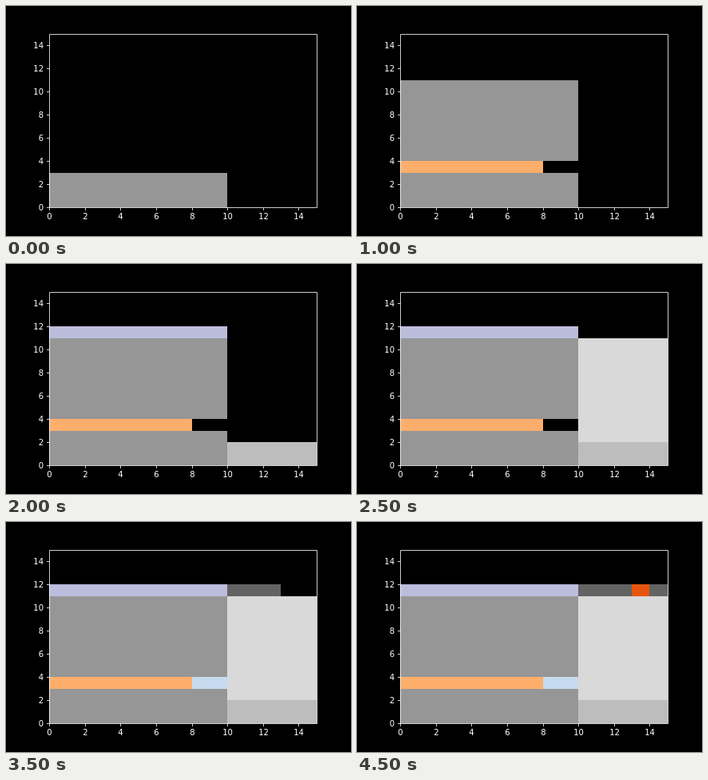
Recreate the animation shown at these times as an HTML page. Size 432 by 288 pixels, loop 5 s.

```html
<!DOCTYPE html>
<html lang="en">
<head>
<meta charset="utf-8">
<title>Stacking rectangles</title>
<style>
  html, body { margin: 0; width: 100%; height: 100%; overflow: hidden; background: #000; }
  svg { display: block; width: 432px; height: 288px; }
  text { font: 10px "DejaVu Sans", sans-serif; fill: #fff; }
  .axes { fill: none; stroke: #fff; stroke-width: 0.8; }
</style>
</head>
<body>
<svg id="chart" viewBox="0 0 432 288"></svg>
<script>
const LOOP = 5000, STEP = 500, MAX = 15;
const LEFT = 54, RIGHT = 388.8, TOP = 34.56, BOTTOM = 252;

// One rectangle appears per step: x, y, width, height in axis units.
const blocks = [
  [0, 0, 10, 3, "#969696"],
  [0, 3, 8, 1, "#fdae6b"],
  [0, 4, 10, 7, "#969696"],
  [0, 11, 10, 1, "#bcbddc"],
  [10, 0, 5, 2, "#bdbdbd"],
  [10, 2, 5, 9, "#d9d9d9"],
  [8, 3, 2, 1, "#c6dbef"],
  [10, 11, 3, 1, "#636363"],
  [13, 11, 1, 1, "#e6550d"],
  [14, 11, 1, 1, "#636363"],
];

const chart = document.getElementById("chart");
const px = x => Math.round(LEFT + (RIGHT - LEFT) * x / MAX);
const py = y => Math.round(BOTTOM - (BOTTOM - TOP) * y / MAX);

function add(tag, attrs, text = "") {
  const node = document.createElementNS("http://www.w3.org/2000/svg", tag);
  for (const [name, value] of Object.entries(attrs)) node.setAttribute(name, value);
  node.textContent = text;
  return chart.appendChild(node);
}

blocks.forEach(([x, y, w, h, fill], i) => {
  const left = px(x), top = py(y + h);
  const rect = add("rect", {
    x: left, y: top, width: px(x + w) - left, height: py(y) - top, fill,
  });
  if (i === 0) return;
  const offset = i * STEP / LOOP;
  rect.animate([
    { opacity: 0, offset: 0 },
    { opacity: 0, offset },
    { opacity: 1, offset },
    { opacity: 1, offset: 1 },
  ], { duration: LOOP, iterations: Infinity });
});

const x0 = px(0) + 0.5, x1 = px(MAX) + 0.5;
const y0 = py(0) + 0.5, y1 = py(MAX) + 0.5;
let axes = `M${x0} ${y0}H${x1}V${y1}H${x0}Z`;
for (let v = 0; v < MAX; v += 2) {
  axes += `M${px(v) + 0.5} ${y0}v3.5M${x0} ${py(v) + 0.5}h-3.5`;
  add("text", { x: px(v) + 0.5, y: 267, "text-anchor": "middle" }, v);
  add("text", { x: 47, y: py(v) + 4, "text-anchor": "end" }, v);
}
add("path", { class: "axes", d: axes });
</script>
</body>
</html>
```
